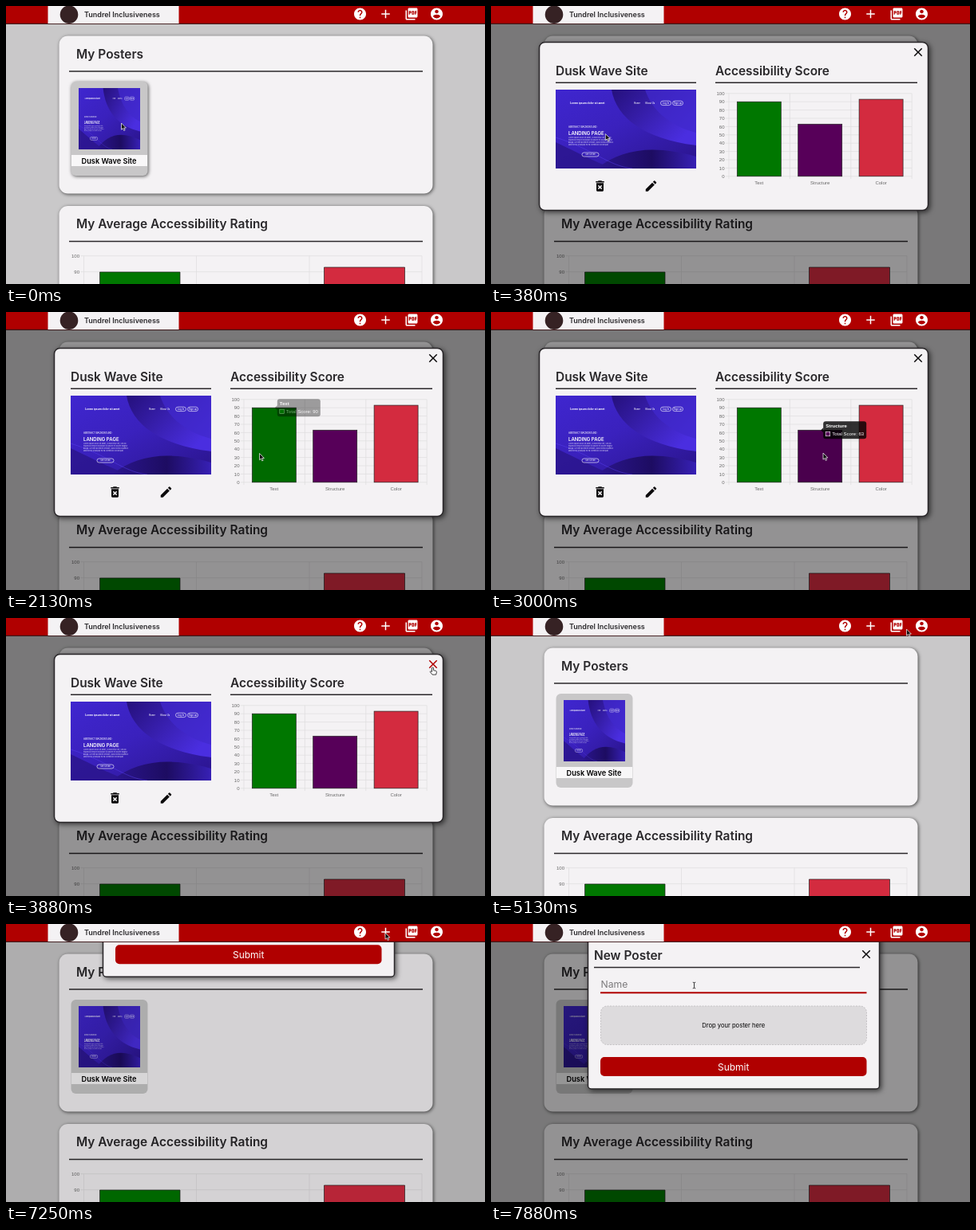
Recreate the animation shown at these times as an HTML page. Size 600 by 349 pixels, loop 8 s.

```html
<!DOCTYPE html>
<html lang="en">
<head>
<meta charset="utf-8">
<title>Poster dashboard</title>
<style>
  html, body { margin: 0; width: 100%; height: 100%; overflow: hidden; background: #c9c8c9; }
  #stage { display: block; width: 600px; height: 349px; font-family: Inter, "Open Sans", sans-serif; }
  .title { font-size: 15.45px; font-weight: 600; fill: #2a282b; }
  .rule { stroke: #2a272a; stroke-width: 1.5; }
  .panel { fill: #f4f2f4; }
  .card { filter: drop-shadow(1.5px 1.5px 2px rgba(0, 0, 0, .65)); }
  .dialog { filter: drop-shadow(2px 2px 3px rgba(0, 0, 0, .6)); }
  .edge { stroke: #2a272a; stroke-width: 1.5; }
  .tick { font: 6px "Liberation Sans", Arial, sans-serif; fill: #666; }
  .grid { stroke: #dfdddf; stroke-width: .7; }
  .mid { text-anchor: middle; }
  .end { text-anchor: end; }
  .poster { font-family: Inter, sans-serif; fill: #fff; }
</style>
</head>
<body>
<svg id="stage" viewBox="0 0 600 349">
  <defs>
    <linearGradient id="sky" x1="0" y1="0" x2="1" y2="1">
      <stop offset="0" stop-color="#3f26cf"/><stop offset=".45" stop-color="#3a21bd"/><stop offset="1" stop-color="#2a148c"/>
    </linearGradient>
    <linearGradient id="fold" x1="0" y1="0" x2="1" y2=".6">
      <stop offset="0" stop-color="#25107c"/><stop offset="1" stop-color="#4a2ee0"/>
    </linearGradient>
    <linearGradient id="deep" x1="0" y1="0" x2="1" y2="0">
      <stop offset="0" stop-color="#2b168f"/><stop offset=".55" stop-color="#1d0c62"/><stop offset="1" stop-color="#3720b5"/>
    </linearGradient>
    <symbol id="poster" viewBox="0 0 176 99" preserveAspectRatio="none">
      <g class="poster">
        <rect width="176" height="99" fill="url(#sky)"/>
        <path d="M70 0C76 36 112 62 176 70V0Z" fill="url(#fold)"/>
        <path d="M112 0C120 26 144 46 176 54V0Z" fill="#4028cc" opacity=".75"/>
        <path d="M0 66C34 82 60 96 74 99H0Z" fill="#2a158a" opacity=".8"/>
        <path d="M52 99C84 72 128 70 176 84V99Z" fill="url(#deep)"/>
        <path d="M0 60C46 74 66 96 96 99" fill="none" stroke="#5a40f0" stroke-width=".8" opacity=".6"/>
        <g font-size="3.3" font-weight="700"><text x="18" y="18.3">Lorem ipsum dolor sit amet</text></g>
        <g font-size="2.8" font-weight="500">
          <text x="98" y="18">Home</text><text x="112" y="18">About Us</text>
          <text class="mid" x="138" y="18">Log In</text><text class="mid" x="153" y="18">Sign up</text>
          <text x="16" y="48">ABSTRACT BACKGROUND</text>
        </g>
        <text x="16" y="57.3" font-size="6" font-weight="600">LANDING PAGE</text>
        <g font-size="2.2" opacity=".85">
          <text x="16" y="61.3">Lorem ipsum dolor sit amet, consectetur elit, sed do</text>
          <text x="16" y="64.2">eiusmod tempor incididunt ut labore et dolore magna</text>
          <text x="16" y="67.1">aliqua. Ut enim ad minim veniam, quis nostrud ullamco</text>
          <text x="16" y="70">laboris nisi ut aliquip ex ea commodo consequat.</text>
        </g>
        <text class="mid" x="43.5" y="82.4" font-size="2.5">SEE MORE</text>
        <g fill="none" stroke="#fff" stroke-width=".6">
          <rect x="131.5" y="14.2" width="13" height="5.4" rx="2.7"/><rect x="146.5" y="14.2" width="13" height="5.4" rx="2.7"/>
          <rect x="33" y="79" width="21" height="5" rx="2.5"/>
        </g>
      </g>
    </symbol>
  </defs>

  <rect width="600" height="349" fill="#c9c8c9"/>
  <g class="card"><rect class="panel" x="66.5" y="37.5" width="468" height="198" rx="11"/></g>
  <text class="title" x="88" y="65.7">My Posters</text>
  <path class="rule" d="M79 82H522"/>
  <rect id="tile" x="81.5" y="95" width="96" height="118" rx="6" fill="#c8c7c8"/>
  <use href="#poster" x="91" y="103" width="77" height="77"/>
  <rect x="82" y="187" width="95" height="14" fill="#f8f7f8"/>
  <text class="mid" x="129" y="197.5" font-size="9.2" font-weight="600">Dusk Wave Site</text>

  <g class="card"><rect class="panel" x="66.5" y="251" width="468" height="120" rx="11"/></g>
  <text class="title" x="88" y="279.3">My Average Accessibility Rating</text>
  <path class="rule" d="M79 295.6H522"/>
  <path class="grid" d="M93 313.7H521M93 333.7H521M97.5 313.7V349M238.5 313.7V349M380 313.7V349M521 313.7V349"/>
  <g class="tick end"><text x="92" y="316">100</text><text x="92" y="336">90</text></g>
  <path d="M117.5 349V334H218V349" fill="#007700" stroke="#222" stroke-width=".7"/>
  <path d="M398.5 349V328H499.5V349" fill="#d32b3f" stroke="#222" stroke-width=".7"/>

  <rect id="shade" y="22" width="600" height="327" opacity="0"/>

  <g id="viewer" opacity="0">
    <g class="dialog"><rect class="panel edge" x="60.5" y="45.5" width="487" height="211" rx="7"/></g>
    <text class="title" x="81" y="87">Dusk Wave Site</text>
    <text class="title" x="281" y="87">Accessibility Score</text>
    <path class="rule" d="M81 96.2H257M281 96.2H534"/>
    <use href="#poster" x="81" y="105" width="176" height="99"/>
    <g id="chart"></g>
    <g id="tools"></g>
    <g id="hint"></g>
  </g>

  <g id="form" visibility="hidden">
    <g class="dialog"><rect class="panel edge" x="121.5" y="12" width="365" height="195" rx="4"/></g>
    <text class="title" x="129" y="45.3">New Poster</text>
    <path class="rule" d="M129 54.5H462"/>
    <g id="formClose"></g>
    <text x="137.5" y="79.8" font-size="12.2" fill="#7b797b">Name</text>
    <rect x="137" y="85.3" width="333.5" height="2" fill="#b00000"/>
    <rect x="137.5" y="103" width="333" height="48.5" rx="8" fill="#dddbdd" stroke="#bbb9bb" stroke-width=".8" stroke-dasharray="2 1.5"/>
    <text class="mid" x="303.7" y="130" font-size="7.6">Drop your poster here</text>
    <rect x="137" y="167" width="333.5" height="24" rx="5" fill="#b00000"/>
    <text class="mid" x="303.7" y="183.8" font-size="12" fill="#fff">Submit</text>
  </g>

  <rect width="600" height="22" fill="#b00000"/>
  <rect y="21.7" width="600" height="1.2" fill="#3a1214"/>
  <rect x="52.5" width="164" height="22" fill="#f4f2f4"/>
  <circle cx="79" cy="10.7" r="11.3" fill="#362224"/>
  <text x="98" y="14" font-size="9" font-weight="600" fill="#2a282b">Tundrel Inclusiveness</text>
  <g id="menu"></g>

  <g id="tip" visibility="hidden">
    <rect width="65" height="17" rx="3" fill="#2a272a"/>
    <text x="4" y="11.4" font-size="7.7" font-weight="600" fill="#fff"></text>
  </g>
  <g id="pointer">
    <path id="arrow" d="M0 0V8.2L1.9 6.5 3.2 9.4 4.6 8.8 3.3 6H5.9Z" fill="#111" stroke="#fff" stroke-width=".7"/>
    <path id="hand" d="M-1 0Q0-1 1 0V3.2L4.3 4Q5 4.3 4.9 5.2L4.2 8.6H-.4L-3.2 5.2Q-3.2 4-1.9 4.4L-1 5Z" fill="#fff" stroke="#111" stroke-width=".8"/>
    <path id="beam" d="M-1.7-3.8Q0-3.8 0-2.8Q0-3.8 1.7-3.8M0-2.8V2.8M-1.7 3.8Q0 3.8 0 2.8Q0 3.8 1.7 3.8" fill="none" stroke="#222" stroke-width=".9"/>
  </g>
</svg>

<script>
const LOOP = 8000, STEP = 125;
const $ = id => document.getElementById(id);
const clamp = v => Math.max(0, Math.min(1, v));
const ease = v => v * v * (3 - 2 * v);

const ring = 'M12 2C6.48 2 2 6.48 2 12s4.48 10 10 10 10-4.48 10-10S17.52 2 12 2z';
const cross = 'M19 6.41L17.59 5 12 10.59 6.41 5 5 6.41 10.59 12 5 17.59 6.41 19 12 13.41 17.59 19 19 17.59 13.41 12z';
const icons = {
  help: ring + 'm1 17h-2v-2h2v2zm2.07-7.75l-.9.92C13.45 12.9 13 13.5 13 15h-2v-.5c0-1.1.45-2.1 1.17-2.83l1.24-1.26c.37-.36.59-.86.59-1.41 0-1.1-.9-2-2-2s-2 .9-2 2H8c0-2.21 1.79-4 4-4s4 1.79 4 4c0 .88-.36 1.68-.93 2.25z',
  add: 'M19 13h-6v6h-2v-6H5v-2h6V5h2v6h6v2z',
  pdf: 'M20 2H8c-1.1 0-2 .9-2 2v12c0 1.1.9 2 2 2h12c1.1 0 2-.9 2-2V4c0-1.1-.9-2-2-2zm-8.5 7.5c0 .83-.67 1.5-1.5 1.5H9v2H7.5V7H10c.83 0 1.5.67 1.5 1.5v1zm5 2c0 .83-.67 1.5-1.5 1.5h-2.5V7H15c.83 0 1.5.67 1.5 1.5v3zm4-3H19v1h1.5V11H19v2h-1.5V7h3v1.5zM9 9.5h1v-1H9v1zM4 6H2v14c0 1.1.9 2 2 2h14v-2H4V6zm10 5.5h1v-3h-1v3z',
  user: ring + 'm0 3c1.66 0 3 1.34 3 3s-1.34 3-3 3-3-1.34-3-3 1.34-3 3-3zm0 14.2c-2.5 0-4.71-1.28-6-3.22.03-1.99 4-3.08 6-3.08 1.99 0 5.97 1.09 6 3.08-1.29 1.94-3.5 3.22-6 3.22z',
  bin: 'M6 19c0 1.1.9 2 2 2h8c1.1 0 2-.9 2-2V7H6v12zm2.46-7.12l1.41-1.41L12 12.59l2.12-2.12 1.41 1.41L13.41 14l2.12 2.12-1.41 1.41L12 15.41l-2.12 2.12-1.41-1.41L10.59 14l-2.13-2.12zM15.5 4l-1-1h-5l-1 1H5v2h14V4z',
  pen: 'M3 17.25V21h3.75L17.81 9.94l-3.75-3.75L3 17.25zM20.71 7.04c.39-.39.39-1.02 0-1.41l-2.34-2.34c-.39-.39-1.02-.39-1.41 0l-1.83 1.83 3.75 3.75 1.83-1.83z',
  close: cross
};
const icon = (name, x, y, fill, size = 18) =>
  `<path d="${icons[name]}" fill="${fill}" transform="translate(${x - size / 2} ${y - size / 2}) scale(${size / 24})"/>`;

// Things the pointer can rest on; "tools" need the viewer open, "menu" needs it closed.
const spots = [
  { group: 'menu', name: 'help', x: 443.5, y: 10, label: 'Help pages' },
  { group: 'menu', name: 'add', x: 475.5, y: 10, label: 'New poster' },
  { group: 'menu', name: 'pdf', x: 508, y: 10, label: 'View PDFs' },
  { group: 'menu', name: 'user', x: 539.5, y: 10, label: 'My account' },
  { group: 'tools', name: 'bin', x: 136.5, y: 226, label: 'Delete poster' },
  { group: 'tools', name: 'pen', x: 200.5, y: 226, label: 'Edit poster' },
  { group: 'tools', name: 'close', x: 535, y: 58 }
];
for (const s of spots) {
  $(s.group).insertAdjacentHTML('beforeend', icon(s.name, s.x, s.y, s.group === 'menu' ? '#fff' : '#0c0b0c'));
  s.node = $(s.group).lastElementChild;
}
$('formClose').innerHTML = icon('close', 470, 38, '#0c0b0c');

const bars = [
  { name: 'Text', value: 90, fill: '#007700', lit: '#006a00' },
  { name: 'Structure', value: 63, fill: '#570059', lit: '#4a004d' },
  { name: 'Color', value: 93, fill: '#d32b3f', lit: '#c21f34' }
];
const levelY = v => 213.8 - v * 1.04;

function buildChart() {
  let out = '';
  for (let v = 0; v <= 100; v += 10) {
    const y = levelY(v);
    out += `<path class="grid" d="M294 ${y}H527"/><text class="tick end" x="292.5" y="${y + 2.1}">${v}</text>`;
  }
  for (let i = 0; i < 4; i++) out += `<path class="grid" d="M${298 + i * 76.4} 109.8V217"/>`;
  bars.forEach((b, i) => {
    b.x = 308.3 + i * 76.4;
    b.mid = b.x + 27.5;
    b.y = levelY(b.value);
    out += `<rect id="bar${i}" x="${b.x}" y="${b.y}" width="55" height="${213.8 - b.y}" fill="${b.fill}" stroke="#222" stroke-width=".7"/>`
      + `<text class="tick mid" x="${b.mid}" y="224.3">${b.name}</text>`;
  });
  $('chart').innerHTML = out;
  bars.forEach((b, i) => b.node = $('bar' + i));
}
buildChart();

// Pointer path: time, x, y
const path = [
  [0, 144.5, 147], [250, 144.5, 148], [750, 137, 228], [1125, 137, 228], [1375, 200, 227], [1625, 201, 227],
  [2000, 299, 192], [2125, 317.5, 177.5], [2500, 335, 172], [2750, 410, 180], [3000, 416, 177],
  [3250, 486, 165], [3500, 500, 135], [3750, 534.5, 62.5], [4250, 534.5, 62.5], [4625, 540, 11],
  [4875, 539, 11], [5125, 520.5, 14], [5250, 510, 11], [5500, 508, 11], [5750, 477, 11], [6000, 474, 11],
  [6250, 442, 11.5], [6500, 442, 11.5], [6750, 475, 11], [7250, 475, 11], [7500, 400, 40], [7875, 254.5, 77]
];
function pointerAt(t) {
  const i = path.findIndex(p => p[0] > t);
  if (i < 0) return path[path.length - 1].slice(1);
  if (i === 0) return path[0].slice(1);
  const a = path[i - 1], b = path[i], k = ease((t - a[0]) / (b[0] - a[0]));
  return [a[1] + (b[1] - a[1]) * k, a[2] + (b[2] - a[2]) * k];
}

const viewerAt = t => t < 4000 ? clamp(t / 375) : clamp((4250 - t) / 375);
const formAt = t => clamp((t - 7125) / 375);

function barAt(t) {
  const [x, y] = pointerAt(t);
  return viewerAt(t) === 1 && bars.find(b => x > b.x && x < b.x + 55 && y > b.y && y < 213.8);
}
function spotAt(t) {
  const [x, y] = pointerAt(t), layer = viewerAt(t) > .5 ? 'tools' : 'menu';
  return formAt(t) ? null : spots.find(s => s.group === layer && Math.abs(x - s.x) < 9 && Math.abs(y - s.y) < 9);
}

const show = (el, on) => el.setAttribute('visibility', on ? 'visible' : 'hidden');

function drawHint(t) {
  const bar = barAt(t);
  for (const b of bars) b.node.setAttribute('fill', b === bar ? b.lit : b.fill);
  if (!bar) { $('hint').innerHTML = ''; return; }
  const alpha = barAt(t - STEP) === bar ? 1 : .45;
  const flip = bar.mid > 470, side = flip ? -1 : 1;
  const x = flip ? bar.mid - 58 : bar.mid + 4, y = bar.y - 11, tip = bar.mid + side;
  $('hint').innerHTML = `<g opacity="${alpha}" font-family="Liberation Sans, Arial, sans-serif" font-size="6" fill="#fff">
    <rect x="${x}" y="${y}" width="54" height="22" rx="3" fill="#000" opacity=".8"/>
    <path d="M${tip} ${bar.y}l${3 * side} -3v6z" fill="#000" opacity=".8"/>
    <text x="${x + 3}" y="${y + 8}" font-weight="700">${bar.name}</text>
    <rect x="${x + 3}" y="${y + 13}" width="5.5" height="5.5" fill="${bar.fill}" stroke="#fff" stroke-width=".6"/>
    <text x="${x + 11}" y="${y + 18}">Total Score: ${bar.value}</text></g>`;
}

function draw(t) {
  const [x, y] = pointerAt(t), viewer = viewerAt(t), form = formAt(t), spot = spotAt(t);
  $('shade').setAttribute('opacity', .4 * Math.max(viewer, form));
  $('viewer').setAttribute('opacity', viewer);
  show($('form'), form > 0);
  $('form').setAttribute('transform', `translate(0 ${-190 * (1 - ease(form))})`);
  $('tile').setAttribute('class', t < 250 ? 'card' : '');
  for (const s of spots) if (s.group === 'tools') s.node.setAttribute('fill', s === spot ? '#b00000' : '#0c0b0c');

  show($('tip'), spot && spot.label);
  if (spot && spot.label) {
    $('tip').setAttribute('transform', `translate(${spot.x - 8.7} ${spot.y + 10})`);
    $('tip').lastElementChild.textContent = spot.label;
  }
  drawHint(t);

  const typing = form === 1 && x > 137 && x < 470 && y > 62 && y < 87;
  $('pointer').setAttribute('transform', `translate(${x} ${y})`);
  show($('hand'), spot);
  show($('beam'), typing);
  show($('arrow'), !spot && !typing);
}

function tick(now) {
  draw(Math.floor(now % LOOP / STEP) * STEP);
  requestAnimationFrame(tick);
}
draw(0);
requestAnimationFrame(tick);
</script>
</body>
</html>
```
